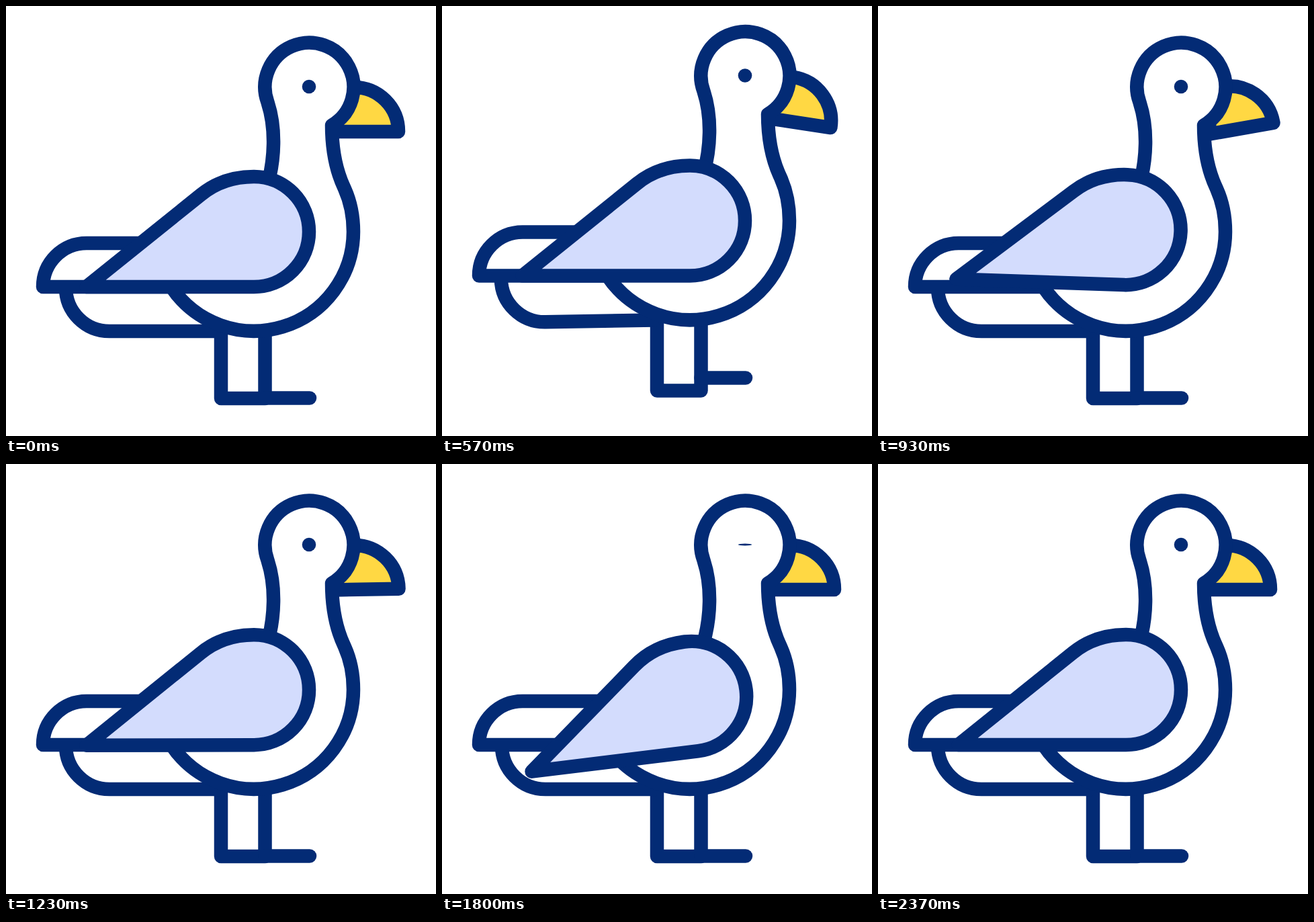
Animation, 640 px wide and 640 px high, one loop 2.57 s. Source, as an HTML page:

```html
<!DOCTYPE html>
<html lang="en">
<head>
<meta charset="utf-8">
<title>Seagull</title>
<style>
  html, body { margin: 0; width: 100%; height: 100%; overflow: hidden; background: #fff; }
  svg { display: block; width: 100vw; height: 100vh; }
  .line { fill: none; stroke: #032b75; stroke-width: 20.5; stroke-linecap: round; stroke-linejoin: round; }
  .white { fill: #fff; }
</style>
</head>
<body>
<svg viewBox="0 0 640 640">
  <g class="line">
    <path id="legs" d="M320 450V584H385.500V450"/>
    <path id="foot" d="M385.500 583.500H452"/>
    <g id="bird">
      <path id="belly" d="M89 419A65 65 0 0 0 154 484H316"/>
      <path id="beak" fill="#ffd843" d="M500 121H518A66 66 0 0 1 584 187H487Z"/>
      <path class="white" d="M389 267C400 228 402 182 389.500 143.500A66 66 0 1 1 485 177.500C485 215 492 247 504 272C513 292 517 313 517 336A148 148 0 0 1 246 418"/>
      <path class="white" d="M250 353H120A65 65 0 0 0 55 418H246"/>
      <path id="wing" fill="#d3dcfd" d="M119.500 418H369A82 82 0 0 0 369 254C340 254 312 263 290 281Z"/>
      <ellipse id="eye" cx="451" cy="120" rx="10.300" ry="10.300" fill="#032b75" stroke="none"/>
    </g>
  </g>
</svg>
<script>
const LOOP = 2570, STEP = 1000 / 30;
const el = id => document.getElementById(id);
const set = (id, value) => el(id).setAttribute("transform", value);
const shift = (id, y) => set(id, `translate(0 ${y})`);

// Sine easing from 0 to 1 between steps a and b.
function ease(n, a, b) {
  const p = Math.min(1, Math.max(0, (n - a) / (b - a)));
  return (1 - Math.cos(Math.PI * p)) / 2;
}
const bump = (n, a, top, b) => ease(n, a, top) - ease(n, top, b);

// The raised wing swings between 40 and -7 degrees, once every 8 steps.
function flap(n) {
  if (n < 34) return 40 * ease(n, 27, 34);
  return n < 71 ? 16.5 + 23.5 * Math.cos(Math.PI * (n - 34) / 4) : 0;
}

function draw(ms) {
  const n = Math.floor((ms % LOOP + 4) / STEP);
  const crouch = bump(n, 0, 10, 17);
  const leap = bump(n, 10, 17, 24);
  const kick = bump(n, 12, 17, 22);
  const nod = bump(n, 12, 17, 25);
  const call = ease(n, 17, 25) - ease(n, 33, 38);
  const wing = 4 * crouch + flap(n);

  shift("bird", 37.5 * crouch - 16.5 * leap);
  shift("legs", -11.5 * kick);
  shift("foot", -30 * kick);
  set("belly", `rotate(${10 * crouch - leap} 316 484)`);
  set("beak", `rotate(${8.6 * nod - 10 * call} 511 155)`);
  set("wing", `rotate(${wing} 451 323)`);
  el("eye").setAttribute("ry", 10.3 * (1 - 0.9 * bump(n, 50, 53.5, 57)));
}

const start = performance.now();
function tick() {
  draw(performance.now() - start);
  requestAnimationFrame(tick);
}
tick();
</script>
</body>
</html>
```
